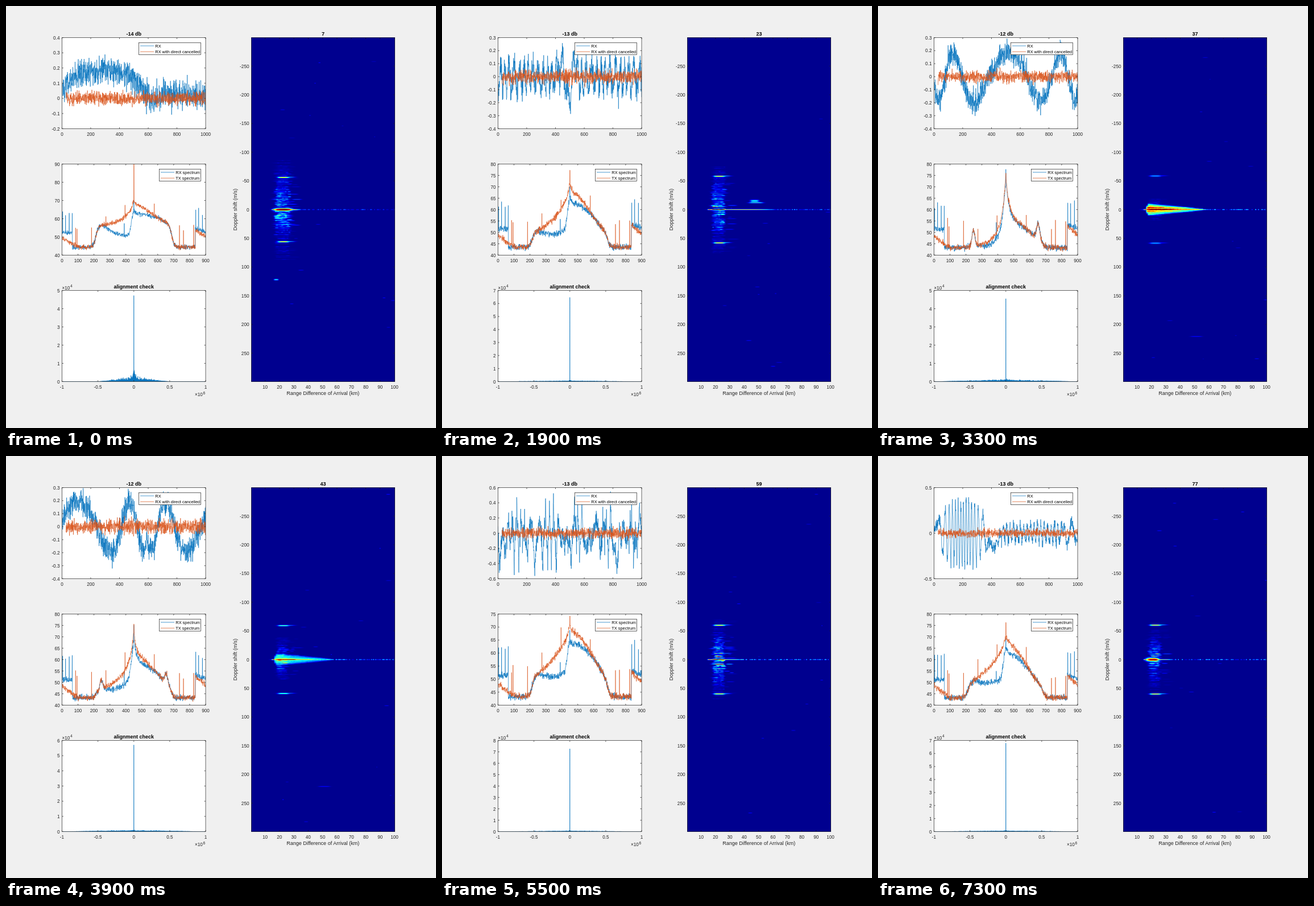
These frames come from a looping animation (756x741 px, 7500 ms). An HTML page with a canvas:

```html
<!DOCTYPE html>
<html lang="en">
<head>
<meta charset="utf-8">
<title>Passive radar</title>
<style>
html, body { margin: 0; width: 100%; height: 100%; overflow: hidden; background: #f0f0f0; }
canvas, svg { position: absolute; left: 0; top: 0; }
text { font-family: "Liberation Sans", Arial, sans-serif; fill: #262626; }
.title { font-weight: bold; fill: #000; }
.leg { fill: #000; }
</style>
</head>
<body>
<canvas id="data" width="756" height="741"></canvas>
<svg id="axes" width="756" height="741" viewBox="0 0 756 741"></svg>
<script>
const ctx = document.getElementById('data').getContext('2d');
const svg = document.getElementById('axes');
const BLUE = '#0072bd', RED = '#d95319', INK = '#262626';
const LEFT = 98.5, W = 252.5, H = 160;
const WAVE_Y = 55.5, SPEC_Y = 277.5, CORR_Y = 499.5;

const { sin, cos, exp, abs, min, max, ceil, floor, round, PI } = Math;
const clamp = (v, a = 0, b = 1) => max(a, min(b, v));
const lerp = (a, b, t) => a + (b - a) * t;
const bump = (x, mid, width, p = 2) => exp(-(abs((x - mid) / width) ** p));

const DEFAULTS = {
  db: -13, lim: [-.4, .3, .1], noise: .045, rest: .022,
  // spectrum: pedestal, bell and its left and right widths, carrier skirt, carrier top, loss of RX, side humps
  pedestal: 0, bell: 24, lw: 175, rw: 195, skirt: 3, skirtW: 10, top: 77, loss: 12, humps: 0,
  // correlation: peak, noise level and half-width, central hump
  peak: 6.8, hiss: .07, wide: .9, hump: .05,
  // echo map: clutter spread, level and half-range, hot core, tail, side lines, wedge
  spread: 30, level: .9, range: 4.3, hotEnd: 27, hotH: .8, hot: .85,
  tailEnd: 45, tail: .5, dash: .38, side: 59, line: .6, wedge: 0, spots: []
};

// Each scene gives what differs at its step; steps between are blended.
const SCENES = [
  { step: 0, db: -14, lim: [-.2, .4, .1],
    wave: x => .03 + .15 * bump(x, .28, .26, 4) - .05 * bump(x, .64, .05),
    pedestal: 11.5, bell: 11.5, lw: 70, rw: 155, top: 90, peak: 4.72, hiss: .28, wide: .48, hump: .65,
    spread: 42, level: .68, range: 6, hotEnd: 28.5, hotH: 2.2, hot: 1.1, tailEnd: 34, tail: .6, dash: .2, side: 56,
    spots: [[17.5, 122, 1.6, 1.2, .38]] },
  { step: 4,
    wave: x => -.05 + .12 * cos(25.9 * (x - .27)) + .06 * cos(50 * (x - .02)),
    top: 77.7, spread: 19, level: 1, range: 5, hot: 1, tailEnd: 58, tail: .65, dash: .3, side: 57.5,
    spots: [[19.5, 123, 3, .7, .38], [23.5, -173, 2.5, .7, .22]] },
  { step: 11, noise: .055, rest: .03,
    wave: x => .1 * sin(190 * x + sin(40 * x)) + .2 * bump(x, .08, .06) * sin(63 * x - .3),
    pedestal: 5, bell: 19, lw: 95, rw: 160, skirt: 5, peak: 6.22,
    spread: 44, level: .75, range: 5, tailEnd: 60, side: 58.5,
    spots: [[47, -15, 3, 2, .38], [48, -12, 5, .9, .42]] },
  { step: 15, db: -12,
    wave: x => .19 * sin(7.63 + 11 * (x - .5) + 40 * (x - .5) ** 3),
    bell: 13, lw: 70, rw: 190, skirt: 19, skirtW: 20, top: 76, loss: 3, humps: 7, peak: 4.55, hiss: .12,
    spread: 10, level: .4, hotEnd: 36, hotH: 1.2, hot: 1, tailEnd: 58, tail: .6, side: 58.5, line: .3, wedge: 1,
    spots: [[51, 221, 4, .7, .12]] },
  { step: 22, lim: [-.6, .6, .2], noise: .05, rest: .034,
    wave: x => .1 * sin(75 * x + 2 * sin(17 * x)) * bump(x, .35, .35, 8)
      + .28 * (bump(x, .18, .035) + bump(x, .33, .025)) * sin(285 * x)
      + .4 * bump(x, .84, .165, 10) * sin(520 * (x - .84) - 4400 * (x - .84) ** 3),
    bell: 25, lw: 200, rw: 220, skirt: 2, top: 75.1, peak: 7.25, tailEnd: 31, side: 60,
    spots: [[27, 32, 9, .7, .25]] },
  { step: 30, lim: [-.6, .6, .2], noise: .085, rest: .034,
    wave: x => .13 * sin(150 * x + 3 * sin(23 * x)) + .32 * sin(95 * x + 5 * sin(31 * x)) ** 9,
    bell: 25, lw: 185, top: 73.4, peak: 7.3, tail: .45, side: 59.5 },
  { step: 35, lim: [-.5, .5, .5], noise: .033,
    wave: x => .35 * bump(x, .2, .17, 4) * sin(345 * (x - .2) - 3260 * (x - .2) ** 3)
      - .15 * bump(x, .42, .03) + .1 * bump(x, .68, .24, 10) * sin(264 * x)
      + .14 * bump(x, .95, .06) * sin(100 * x),
    rw: 180, skirt: 4, top: 76.3,
    spread: 26, level: .68, hotEnd: 25, hotH: 2.8, hot: .9, tailEnd: 34, side: 60 }
].map(s => ({ ...DEFAULTS, ...s }));

function random(seed) {
  let s = seed * 7919 + 12345 | 0;
  return () => {
    s = s + 0x6d2b79f5 | 0;
    let v = Math.imul(s ^ s >>> 15, 1 | s);
    v = v + Math.imul(v ^ v >>> 7, 61 | v) ^ v;
    return ((v ^ v >>> 14) >>> 0) / 4294967296;
  };
}
const gauss = r => (r() + r() + r() + r() - 2) * 1.73;

// Blends every number; waves, limits and spots come from the nearer scene.
function sceneAt(step) {
  const i = max(0, SCENES.findIndex(s => s.step >= step) - 1);
  const a = SCENES[i], b = SCENES[i + 1];
  const t = (step - a.step) / (b.step - a.step);
  const near = t < .5 ? a : b, out = { ...near };
  for (const k in out) if (typeof out[k] === 'number') out[k] = lerp(a[k], b[k], t);
  out.db = near.db;
  out.shift = .137 * (step - near.step);
  return out;
}

function plot(values, y, lo, hi, color, from = 0) {
  ctx.save();
  ctx.beginPath();
  ctx.rect(LEFT, y, W, H);
  ctx.clip();
  ctx.beginPath();
  const n = values.length - 1;
  for (let i = from; i <= n; i++) ctx.lineTo(LEFT + W * i / n, y + H * (hi - values[i]) / (hi - lo));
  ctx.strokeStyle = color;
  ctx.lineWidth = .65;
  ctx.lineJoin = 'round';
  ctx.stroke();
  ctx.restore();
}

const series = (n, f) => Array.from({ length: n + 1 }, (_, i) => f(i));

function drawWave(s, r) {
  const [lo, hi] = s.lim;
  const wrap = x => s.shift ? (x + s.shift + 2) % 1 : x;
  plot(series(1000, i => s.wave(wrap(i / 1000)) + s.noise * gauss(r)), WAVE_Y, lo, hi, BLUE);
  plot(series(1000, () => s.rest * gauss(r)), WAVE_Y, lo, hi, RED, 28);
}

// Transmitted signal above the floor: a bell inside the channel band.
function signal(s, x) {
  const d = x - 450;
  const band = 1 / (1 + exp((abs(d) - 238) / 8));
  const bell = d < 0 ? exp(d / s.lw) : bump(d, 0, s.rw);
  return band * (s.pedestal + s.bell * bell + s.skirt * exp(-abs(d) / s.skirtW)) + s.humps * bump(abs(d), 203, 13);
}

// Share of the loss seen by the receiver.
function notch(x) {
  if (x < 420) return clamp((x - 250) / 170);
  return x < 440 ? lerp(1, .5, (x - 420) / 20) : .5 * clamp((600 - x) / 160);
}

function drawSpectrum(s, r) {
  const peaksTx = [85, 94, 185, 275, 395, 578, 736, 761, 825];
  const peaksRx = [4, 22, 45, 64, 390, 838, 856, 880];
  const base = 43.3 + s.pedestal * .1;
  const txEdge = x => x < 100 ? 5 - x * .05 : x > 835 ? 9.5 - (x - 836) * .06 : 0;
  const rxEdge = x => x < 65 ? 8 : x > 835 ? 10 - (x - 836) * .025 : 0;
  const rise = x => (abs(x - 450) < 200 ? 5 : 9) + 3 * r();
  const build = (level, peaks) =>
    series(900, x => base + level(x) + .65 * gauss(r) + (peaks.includes(x) ? rise(x) : 0));
  const rx = build(x => signal(s, x) - s.loss * notch(x) + rxEdge(x), peaksRx);
  const tx = build(x => signal(s, x) + txEdge(x), peaksTx);
  tx[450] = tx[451] = s.top;
  rx[450] += 4;
  const hi = ceil(s.top / 5) * 5;
  plot(rx, SPEC_Y, 40, hi, BLUE);
  plot(tx, SPEC_Y, 40, hi, RED);
}

function drawCorrelation(s, r) {
  const values = series(1000, i => {
    const x = abs(i / 500 - 1);
    if (x === 0) return s.peak;
    if (i % 2) return 0;
    return .015 + s.hiss * max(0, 1 - x / s.wide) * (.35 + .8 * r() * r()) + s.hump * exp(-x / .015) * (.6 + .5 * r());
  });
  plot(values, CORR_Y, 0, ceil(s.peak), BLUE);
}

const MAP_W = 253, MAP_H = 605;
const image = ctx.createImageData(MAP_W, MAP_H);
const field = new Float32Array(MAP_W * MAP_H);
const kmX = km => 430.3 + 2.527 * km;
const speedY = v => 357.5 + 1.008 * v;

function streak(km, v, halfKm, halfV, level) {
  const cx = kmX(km) - 431, cy = speedY(v) - 55.5, rx = halfKm * 2.527;
  const x0 = max(0, ceil(cx - rx * 1.5)), x1 = min(MAP_W - 1, cx + rx * 1.5);
  const y0 = max(0, ceil(cy - halfV * 2)), y1 = min(MAP_H - 1, cy + halfV * 2);
  for (let y = y0; y <= y1; y++) {
    for (let x = x0; x <= x1; x++) {
      const k = y * MAP_W + x, val = level * bump(x, cx, rx, 4) * bump(y, cy, halfV);
      field[k] = max(field[k], val) + min(field[k], val) * .25;
    }
  }
}

function drawClutter(s, r) {
  for (let v = -100; v <= 100; v += 1.6 + r()) {
    const a = s.level * exp(-((abs(v) / s.spread) ** 1.4)) * (.2 + .8 * r());
    if (a < .03) continue;
    streak(21.8 + gauss(r) * .7, v, s.range * (.5 + .5 * r()), .8, a * .55);
    for (let n = 0; n < 3; n++) streak(22 + (r() * 2 - 1) * s.range * .8, v, .6 + 1.4 * r(), .8, a * (.5 + .5 * r()));
    if (r() < .3) streak(27 + r() * 5, v, 1 + r() * 3, .7, a * .4);
  }
}

function drawWedge(s, r) {
  for (let v = -10; v <= 10; v++) {
    const shade = s.wedge * (.6 + .4 * r());
    for (let km = 17; km < 58; km += 1) {
      const u = (km - 17) / 41, h = 11 * (1 - u) ** .8 * clamp((km - 15) / 3);
      if (abs(v) < h) streak(km, v, .9, .8, shade * (.85 - .4 * u) * (1 - (v / h) ** 2) ** .6 * (.8 + .2 * r()));
    }
  }
}

function drawMap(s, r) {
  field.fill(0);
  drawClutter(s, r);
  if (s.wedge > .05) drawWedge(s, r);
  for (const v of [-s.side, s.side]) {
    streak(22.5, v, 4, 1.1, s.line);
    streak(24.5, v - .5, 6, .7, s.line * .5);
  }
  streak(15.5, 0, 1.2, .8, .65);
  streak((16 + s.hotEnd) / 2, 0, (s.hotEnd - 16) / 2, s.hotH, s.hot);
  streak((20 + s.tailEnd) / 2, 0, (s.tailEnd - 20) / 2, .8, s.tail);
  for (let km = s.tailEnd; km < 100; km += .8 + r() * 2) streak(km, 0, .3 + r() * .7, .8, s.dash * (.2 + r() * .9));
  for (const spot of s.spots) streak(...spot);
  for (let n = 0; n < 14; n++) streak(20 + r() * 80, (r() * 2 - 1) * 290, .4 + r() * 1.5, .7, .03 + r() * .08);

  const px = image.data;
  field.forEach((f, k) => {
    const v = 4 * clamp(.0156 + f);
    px.set([3, 2, 1].map(c => 255 * clamp(1.5 - abs(v - c))), k * 4);
    px[k * 4 + 3] = 255;
  });
  ctx.putImageData(image, 431, 55);
}

const text = (x, y, str, anchor = 'middle', size = 8.2, cls = '', more = '') =>
  `<text x="${x}" y="${y}" text-anchor="${anchor}" font-size="${size}" class="${cls}" ${more}>${str}</text>`;
const title = (x, y, str) => text(x, y, str, 'middle', 9, 'title');
const path = (d, color = INK, width = .7) => `<path d="${d}" fill="none" stroke="${color}" stroke-width="${width}"/>`;

// xs and ys hold [position, label] pairs
function frame(x, y, w, h, xs, ys) {
  let d = `M${x} ${y}h${w}v${h}h${-w}z`, out = '';
  for (const [p, label] of xs) {
    d += `M${p} ${y}v2.5M${p} ${y + h}v-2.5`;
    out += text(p, y + h + 12.4, label);
  }
  for (const [p, label] of ys) {
    d += `M${x} ${p}h2.5M${x + w} ${p}h-2.5`;
    out += text(x - 4, p + 3, label, 'end');
  }
  return path(d) + out;
}

const ticks = (lo, hi, gap, pos) => series(round((hi - lo) / gap), i => {
  const v = +(lo + i * gap).toFixed(1);
  return [pos(v), String(v)];
});

const chart = (top, x, y) => frame(LEFT, top, W, H,
  ticks(...x, v => LEFT + W * (v - x[0]) / (x[1] - x[0])),
  ticks(...y, v => top + H * (y[1] - v) / (y[1] - y[0])));

function legend(x, y, w, a, b) {
  const row = (dy, color, str) =>
    path(`M${x + 2.5} ${y + dy}h24`, color) + text(x + 28.8, y + dy + 2.7, str, 'start', 7.4, 'leg');
  return `<rect x="${x}" y="${y}" width="${w}" height="21" fill="#fff" stroke="${INK}" stroke-width=".7"/>` +
    row(5.5, BLUE, a) + row(15.7, RED, b);
}

const power = (x, y, n) => text(x, y, '×10', 'start') + text(x + 14.6, y - 3.8, n, 'start', 6.6);

function drawAxes(s, step) {
  const top = ceil(s.top / 5) * 5;
  svg.innerHTML =
    chart(WAVE_Y, [0, 1000, 200], s.lim) + title(224.8, 51.6, s.db + ' db') +
    legend(233.5, 64.5, 109, 'RX', 'RX with direct cancelled') +
    chart(SPEC_Y, [0, 900, 100], [40, top, top > 80 ? 10 : 5]) +
    legend(269.5, 286.5, 73, 'RX spectrum', 'TX spectrum') +
    chart(CORR_Y, [-1, 1, .5], [0, ceil(s.peak), 1]) + title(224.8, 495.6, 'alignment check') +
    power(98.5, 498, 4) + power(332, 685.4, 6) +
    frame(431.5, 55.5, 252, 604, ticks(10, 100, 10, kmX), ticks(-250, 250, 50, speedY)) +
    title(557.5, 51.6, 7 + 2 * step) +
    text(557.2, 683, 'Range Difference of Arrival (km)', 'middle', 9) +
    text(0, 0, 'Doppler shift (m/s)', 'middle', 9, '', 'transform="translate(406 357.5) rotate(-90)"');
}

function draw(step) {
  const s = sceneAt(step), r = random(step + 1);
  ctx.clearRect(0, 0, 756, 741);
  ctx.fillStyle = '#fff';
  for (const y of [WAVE_Y, SPEC_Y, CORR_Y]) ctx.fillRect(LEFT, y, W, H);
  drawWave(s, r);
  drawSpectrum(s, r);
  drawCorrelation(s, r);
  drawMap(s, r);
  drawAxes(s, step);
}

let shown = -1;
function tick() {
  const t = performance.now() % 7500;
  const step = t < 500 ? 0 : 1 + floor((t - 500) / 200);
  if (step !== shown) draw(shown = step);
  requestAnimationFrame(tick);
}
tick();
</script>
</body>
</html>
```
